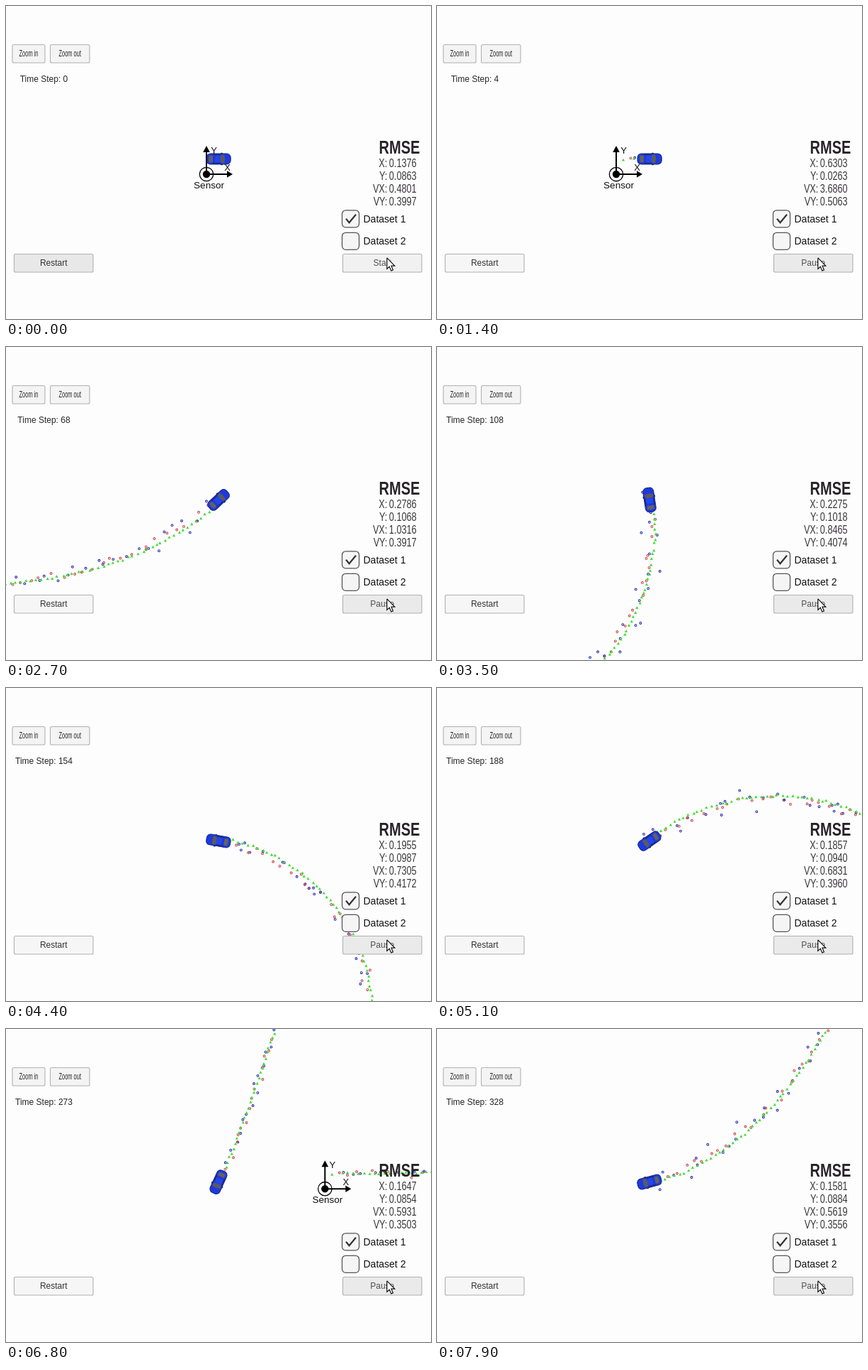
Animation, 600 px wide and 441 px high, one loop 8000 ms. Source, as an HTML page with a canvas:

```html
<!DOCTYPE html>
<html lang="en">
<head>
<meta charset="utf-8">
<title>Tracking simulator</title>
<style>
html, body { margin: 0; width: 100%; height: 100%; overflow: hidden; background: #fefdfe; }
canvas { display: block; }
</style>
</head>
<body>
<canvas id="stage" width="600" height="441"></canvas>
<script>
const ctx = document.getElementById('stage').getContext('2d');
const LOOP = 8000, FRAME = 100, PRESS = 700;
const CAR = { x: 300, y: 215 };
const SENSOR = { x: -17, y: 22 }; // relative to the car's first position
const FONT = '"Liberation Sans", Arial, sans-serif';

// time, step, then RMSE of X, Y, VX, VY
const keys = [
  [900, 0, 0.1376, 0.0863, 0.4801, 0.3997],
  [1400, 4, 0.6303, 0.0263, 3.6860, 0.5063],
  [2700, 68, 0.2786, 0.1068, 1.0316, 0.3917],
  [4400, 154, 0.1955, 0.0987, 0.7305, 0.4172],
  [5900, 226, 0.1775, 0.0901, 0.6433, 0.3782],
  [6800, 273, 0.1647, 0.0854, 0.5931, 0.3503],
  [7900, 328, 0.1581, 0.0884, 0.5619, 0.3556]
];

// the car steers through a figure eight with a sinusoidal yaw rate
const phase = s => s * 2 * Math.PI / 500;
const heading = s => 2.188 * (1 - Math.cos(phase(s)));

const path = [{ x: 0, y: 0 }];
for (let s = 0; s < 340; s++) {
  const v = 7.21 + 0.29 * Math.cos(2 * phase(s + 0.5)), a = heading(s + 0.5);
  path.push({ x: path[s].x + v * Math.cos(a), y: path[s].y - v * Math.sin(a) });
}

// repeatable noise, roughly normal with unit spread
function rand(n) {
  const v = Math.sin(n * 127.1 + 11.7) * 43758.5453;
  return v - Math.floor(v);
}
const noise = n => (rand(n) + rand(n + 0.31) + rand(n + 0.67) - 1.5) * 2;

// a point shifted from p along the direction a and to its left
function shifted(p, a, along, side) {
  const c = Math.cos(a), n = Math.sin(a);
  return { x: p.x + along * c - side * n, y: p.y - along * n - side * c };
}

// lidar scatters evenly, radar mostly in bearing; the estimate drifts out of turns
const marks = path.map((p, s) => {
  const radar = s % 2 === 1;
  const dx = p.x - SENSOR.x, dy = SENSOR.y - p.y;
  const spread = radar ? 0.02 * Math.hypot(dx, dy) : 3.6;
  const reading = shifted(p, Math.atan2(dy, dx), 3.6 * noise(s), spread * noise(s + 500));
  const drift = -5 * Math.sin(phase(s));
  const guess = shifted(p, heading(s), s ? noise(s + 900) : -7, drift + 0.8 * noise(s + 1300));
  return { radar, reading, guess };
});

function stateAt(t) {
  if (t <= keys[0][0]) return { step: 0, rmse: keys[0].slice(2) };
  let i = 0;
  while (i < keys.length - 2 && t > keys[i + 1][0]) i++;
  const a = keys[i], b = keys[i + 1];
  const step = Math.round(a[1] + (b[1] - a[1]) * (t - a[0]) / (b[0] - a[0]));
  // errors settle with the square root of the sample count
  const f = s => 1 / Math.sqrt(s + 0.5);
  const k = (f(step) - f(a[1])) / (f(b[1]) - f(a[1]));
  return { step, rmse: a.slice(2).map((v, j) => v + (b[j + 2] - v) * k) };
}

function text(str, x, y, size, { align = 'center', color = '#262626', weight = '', squeeze = 1 } = {}) {
  ctx.save();
  ctx.translate(x, y);
  ctx.scale(squeeze, 1);
  ctx.font = `${weight} ${size}px ${FONT}`;
  ctx.textAlign = align;
  ctx.fillStyle = color;
  ctx.fillText(str, 0, 0);
  ctx.restore();
}

function box(x, y, w, h, r, fill, stroke, width = 1) {
  ctx.beginPath();
  ctx.roundRect(x, y, w, h, r);
  ctx.fillStyle = fill;
  ctx.fill();
  if (!stroke) return;
  ctx.strokeStyle = stroke;
  ctx.lineWidth = width;
  ctx.stroke();
}

function poly(points, fill) {
  ctx.beginPath();
  points.forEach(([x, y]) => ctx.lineTo(x, y));
  ctx.closePath();
  ctx.fillStyle = fill;
  ctx.fill();
}

function line(points, color, width) {
  ctx.beginPath();
  points.forEach(([x, y]) => ctx.lineTo(x, y));
  ctx.strokeStyle = color;
  ctx.lineWidth = width;
  ctx.stroke();
}

function disc(x, y, r, fill) {
  ctx.beginPath();
  ctx.arc(x, y, r, 0, 2 * Math.PI);
  ctx.fillStyle = fill;
  ctx.fill();
}

function ring(x, y, r, color, width) {
  ctx.beginPath();
  ctx.arc(x, y, r, 0, 2 * Math.PI);
  ctx.strokeStyle = color;
  ctx.lineWidth = width;
  ctx.stroke();
}

function drawMarks(step) {
  const shown = marks.slice(0, step + 1);
  for (const { reading: p, radar } of shown) ring(p.x, p.y, 1.4, radar ? '#2626b4' : '#d04444', 1.1);
  for (const { guess: { x, y } } of shown) {
    poly([[x, y - 2.1], [x + 2.1, y + 1.8], [x - 2.1, y + 1.8]], '#42dc36');
  }
}

function drawSensor(x, y) {
  ctx.save();
  ctx.translate(x, y);
  ring(0, 0, 9.7, '#000', 1.3);
  line([[0, -33], [0, 0], [31, 0]], '#000', 2);
  poly([[0, -40], [4.8, -31], [-4.8, -31]], '#000');
  poly([[37, 0], [29, -4.8], [29, 4.8]], '#000');
  disc(0, 0, 5.2, '#000');
  const black = { color: '#111' };
  text('Y', 10.5, -29, 13, black);
  text('X', 29.5, -5, 13, black);
  text('Sensor', 3.5, 20, 13.5, black);
  ctx.restore();
}

function drawCar(angle) {
  ctx.save();
  ctx.translate(CAR.x, CAR.y + 0.5);
  ctx.rotate(-angle);
  box(3, -8.8, 3, 17.6, 1, '#15206a');
  box(-17, -7.5, 34.2, 15, 5.5, '#1c3ae0', '#17247c', 1);
  box(-5, -5, 8, 10, 2, '#2446ee');
  poly([[3, -5], [8, -6.2], [9.2, 0], [8, 6.2], [3, 5]], '#5d5a5c');
  poly([[-8, -4.5], [-13, -5], [-13.8, 0], [-13, 5], [-8, 4.5]], '#66615c');
  for (const y of [-6.6, 5.4]) box(-8, y, 11, 1.2, 0, '#20285a');
  ctx.restore();
}

function button(x, y, w, h, label, fill, style) {
  box(x + 0.5, y + 0.5, w - 1, h - 1, 2, fill, '#b2b0b2', 1.1);
  text(label, x + w / 2, y + h / 2 + 4.2, 12, style);
}

function checkbox(y, label, on) {
  box(474.5, y, 24, 24, 5, '#f6f5f6', '#555', 1.3);
  text(label, 504.5, y + 16.7, 14, { align: 'left', color: '#111' });
  if (on) line([[480, y + 12], [484.5, y + 17.5], [494, y + 6]], '#333', 2.2);
}

function drawCursor() {
  const tip = [[537.8, 354.8], [537.8, 370.5], [541.3, 367.3], [543.8, 373],
    [546.4, 371.9], [544, 366.2], [548.8, 366.2], [537.8, 354.8]];
  poly(tip, '#fff');
  line(tip, '#111', 1.2);
}

function drawPanel(t, { step, rmse }) {
  const running = t >= PRESS;
  const narrow = { squeeze: 0.62 };
  button(8.5, 54, 47, 26.5, 'Zoom in', '#f5f4f5', narrow);
  button(62, 54, 56.5, 26.5, 'Zoom out', '#f5f4f5', narrow);
  text('Time Step: ' + step, 53.5, 106.7, 12);

  text('RMSE', 555.5, 208, 25, { weight: 'bold', color: '#262426', squeeze: 0.8 });
  ['X', 'Y', 'VX', 'VY'].forEach((name, i) => {
    // thin space after the colon
    text(`${name}:\u2009${rmse[i].toFixed(4)}`, 579.5, 227 + 17.9 * i, 16,
      { align: 'right', color: '#383638', squeeze: 0.79 });
  });

  checkbox(287.8, 'Dataset 1', true);
  checkbox(319.3, 'Dataset 2', false);
  button(11, 349, 112.5, 26.5, 'Restart', running ? '#f7f6f7' : '#e9e8e9', { color: '#333' });
  button(475, 349, 112.5, 26.5, running ? 'Pause' : 'Start', running ? '#ebeaeb' : '#f2f1f2', { color: '#505050' });
  drawCursor();
}

function draw(t) {
  const state = stateAt(t), here = path[state.step];
  const x = CAR.x - here.x, y = CAR.y - here.y;
  ctx.fillStyle = '#fefdfe';
  ctx.fillRect(0, 0, 600, 441);
  ctx.save();
  ctx.translate(x, y);
  if (t >= keys[0][0]) drawMarks(state.step);
  ctx.restore();
  drawCar(heading(state.step));
  drawSensor(x + SENSOR.x, y + SENSOR.y);
  drawPanel(t, state);
}

const start = performance.now();
function tick(now) {
  const t = Math.max(0, now - start) % LOOP;
  draw(Math.floor(t / FRAME) * FRAME);
  requestAnimationFrame(tick);
}
draw(0);
requestAnimationFrame(tick);
</script>
</body>
</html>
```
